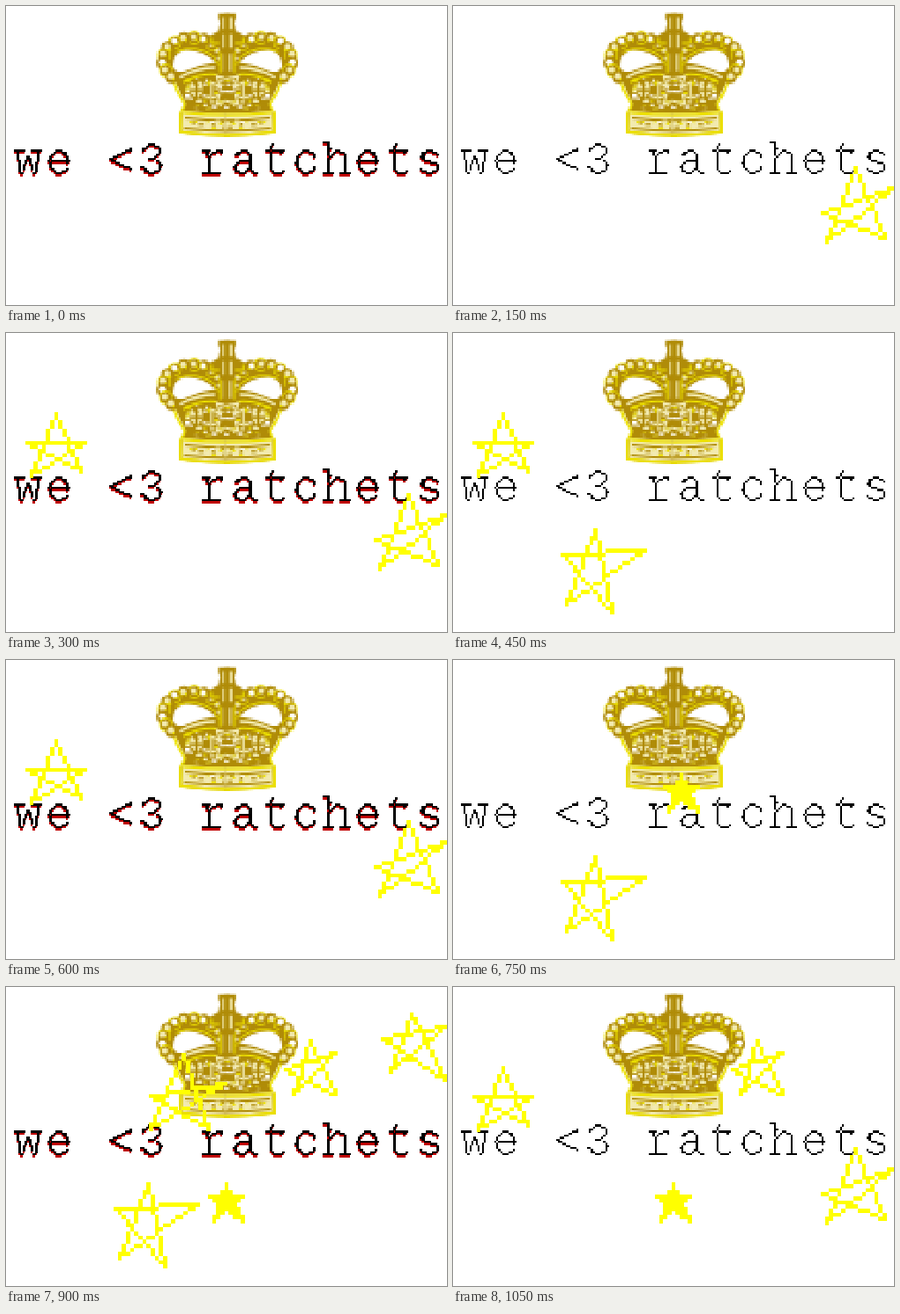
An HTML page with a canvas that plays this animation: 500x340 px, repeating every 1.2 s.

```html
<!DOCTYPE html>
<html lang="en">
<head>
<meta charset="utf-8">
<title>we &lt;3 ratchets</title>
<style>
  html, body { margin: 0; width: 100%; height: 100%; overflow: hidden; background: #fff; }
  canvas { display: block; width: 500px; height: 340px; }
</style>
</head>
<body>
<canvas id="stage" width="500" height="340"></canvas>
<script>
const PIXEL = 7 / 3;      // size of one coarse pixel
const CELL = 2 * PIXEL;   // width of the star pen
const STEP = 150;
const GOLD = '#b08c08', LEMON = '#ece000', PALE = '#f2eab0', WHITE = '#fff', YELLOW = '#ff0';
const MESSAGE = 'we <3 ratchets';

const stage = document.getElementById('stage').getContext('2d');
stage.imageSmoothingEnabled = false;

function coarseContext() {
  const canvas = document.createElement('canvas');
  canvas.width = 215;
  canvas.height = 146;
  return canvas.getContext('2d', { willReadFrequently: true });
}

function block(x, y, size, originX = 0, originY = 0) {
  const left = Math.round(originX + x * size), top = Math.round(originY + y * size);
  const right = Math.round(originX + (x + 1) * size);
  const bottom = Math.round(originY + (y + 1) * size);
  stage.fillRect(left, top, right - left, bottom - top);
}

// Lettering: thin the glyphs to one coarse pixel and add slab serifs.
const SERIFS = {   // offset from glyph centre, row, length
  w: [[-6, 70, 5], [2, 70, 5]],
  r: [[-5, 70, 4], [-5, 81, 9]],
  h: [[-6, 66, 3], [-6, 81, 5], [2, 81, 5]]
};

function makeLettering() {
  const g = coarseContext(), { width, height } = g.canvas;
  const centre = i => 10.5 + 15 * i;
  g.font = '22px "Liberation Mono", "Courier New", monospace';
  g.textAlign = 'center';
  [...MESSAGE].forEach((char, i) => g.fillText(char, centre(i), 82));
  const data = g.getImageData(0, 0, width, height).data;
  const alpha = (x, y) => data[(y * width + x) * 4 + 3];
  const dots = [];
  for (let y = 60; y < 90; y++) {
    for (let x = 1; x < width - 1; x++) {
      const a = alpha(x, y);
      const ridgeX = a >= alpha(x - 1, y) && a > alpha(x + 1, y);
      const ridgeY = a >= alpha(x, y - 1) && a > alpha(x, y + 1);
      if (a > 100 && (ridgeX || ridgeY)) dots.push([x, y]);
    }
  }
  [...MESSAGE].forEach((char, i) => {
    for (const [dx, y, length] of SERIFS[char] || []) {
      for (let n = 0; n < length; n++) dots.push([Math.floor(centre(i)) + dx + n, y]);
    }
  });
  return dots;
}

function drawLettering(dots, shaded) {
  const print = (color, dx, dy) => {
    stage.fillStyle = color;
    for (const [x, y] of dots) block(x, y, PIXEL, dx, dy);
  };
  if (shaded) {
    print('#c00000', 0, PIXEL);
    print('#000', 1, 0);
  }
  print('#000', 0, 0);
}

// Crown: one half in stage units around its axis, then mirrored.
function seededRandom(seed) {
  return () => (seed = seed * 16807 % 2147483647) / 2147483647;
}

function drawCrownHalf(g) {
  const fill = (path, color) => { g.fillStyle = color; g.fill(new Path2D(path)); };
  const line = (path, color, width) => {
    g.strokeStyle = color;
    g.lineWidth = width;
    g.stroke(new Path2D(path));
  };
  const dot = (x, y, r, color) => {
    g.fillStyle = color;
    g.beginPath();
    g.arc(x, y, r, 0, 7);
    g.fill();
  };
  const random = seededRandom(41);
  const flecks = (count, x, y, width, height) => {
    for (let i = 0; i < count; i++) {
      g.fillStyle = [GOLD, LEMON, PALE, WHITE][Math.floor(random() * 4)];
      g.fillRect(x + random() * width, y + random() * height, 2.5 + random() * 4, 2.4);
    }
  };

  // body and the open space under the arch
  fill('M3 48 H-20 Q-38 34 -60 44 Q-76 58 -62 80 L-47 112 L-54 122 V144 Q-28 148 3 148 Z', GOLD);
  line('M-64 78 Q-58 98 -48 112 L-53 122 V143 Q-28 147 3 147', LEMON, 3);
  fill('M-13 64 Q-28 49 -48 50 Q-62 53 -62 68 Q-59 77 -48 74 Q-32 66 -13 64 Z', WHITE);
  line('M-14 58 Q-36 42 -58 52', LEMON, 2);
  line('M-54 81 Q-34 70 -14 70', PALE, 3);
  line('M-50 87 Q-32 76 -12 78', LEMON, 2.5);

  // ornaments above the band
  flecks(75, -49, 82, 48, 34);
  fill('M-41 86 L-35 93 L-30 85 L-27 97 L-34 105 L-43 98 Z', PALE);
  line('M-35 84 V107 M-43 96 H-26', GOLD, 3);
  line('M3 83 L-12 80 L-9 91 L-18 87 V105 L-9 101 L-12 111 L3 108', PALE, 2.5);
  line('M-47 112 Q-25 118 3 118', GOLD, 3);

  // band
  fill('M-51 119 Q-25 122 3 122 V146 Q-28 146 -52 142 Z', PALE);
  line('M-50 121 Q-25 124 3 124', LEMON, 2.5);
  line('M-48 127 Q-25 130 3 130 M-49 139 Q-25 142 3 142', GOLD, 2.6);
  flecks(22, -48, 129, 47, 9);
  line('M-53 121 V143 Q-28 147 3 147', LEMON, 2.6);

  // pearls along the arch
  for (let i = 0; i < 12; i++) {
    const angle = -(6 + i * 20) * Math.PI / 180;
    const x = -40 + 33 * Math.cos(angle), y = 62 + 26 * Math.sin(angle);
    dot(x, y, 7.4, i % 2 ? GOLD : LEMON);
    dot(x, y, 6.2, GOLD);
    dot(x - 1, y - 1, 3.7, i % 3 ? PALE : WHITE);
    dot(x + 2, y + 2, 1.6, LEMON);
  }

  // cross and centre post
  fill('M3 9 H-10 V14 L-8 19 L-10 28 H3 Z', GOLD);
  fill('M3 28 H-9 L-20 34 V43 L-9 48 V78 H3 Z', GOLD);
  line('M-18 36 V42 H-9 M-8 53 V76', LEMON, 2.2);
  line('M-4 13 V26 M-4 32 V47 M-3 54 V74', PALE, 2.5);
}

function makeCrown() {
  const g = coarseContext();
  for (const side of [1, -1]) {
    g.setTransform(side / PIXEL, 0, 0, 1 / PIXEL, 251 / PIXEL, 0);
    drawCrownHalf(g);
  }
  return g.canvas;
}

// Stars: tips in pen cells, clockwise from the top.
const SMALL = [[4, 0], [8, 3], [8, 9], [1, 9], [0, 3]];
const STARS = {
  left: { at: [22, 90], tips: [[7, 0], [14, 7], [13, 14], [1, 15], [0, 7]] },
  bottom: { at: [122, 222], tips: [[8, 0], [20, 5], [12, 20], [1, 18], [0, 6]] },
  right: { at: [417, 182], tips: [[8, 0], [17, 5], [15, 17], [1, 18], [0, 11]] },
  crown: { at: [162, 75], tips: [[8, 0], [18, 7], [14, 18], [0, 18], [0, 10]] },
  upper: { at: [315, 59], tips: [[6, 0], [12, 3], [12, 13], [2, 13], [0, 7]] },
  corner: { at: [425, 29], tips: [[7, 0], [15, 3], [15, 16], [2, 14], [0, 6]] },
  low: { at: [229, 222], tips: SMALL, solid: true },
  middle: { at: [238, 128], tips: SMALL, solid: true }
};

function drawStar({ at, tips, solid }) {
  const corners = tips.map((_, i) => tips[i * 2 % 5]);
  stage.fillStyle = YELLOW;
  corners.forEach(([x0, y0], i) => {
    const [x1, y1] = corners[(i + 1) % 5];
    const steps = Math.max(Math.abs(x1 - x0), Math.abs(y1 - y0));
    for (let n = 0; n <= steps; n++) {
      const t = n / steps;
      block(Math.round(x0 + (x1 - x0) * t), Math.round(y0 + (y1 - y0) * t), CELL, ...at);
    }
  });
  if (!solid) return;
  const shape = new Path2D('M' + corners.join('L') + 'Z');
  for (let y = 0; y < 10; y++) {
    for (let x = 0; x < 9; x++) {
      if (stage.isPointInPath(shape, x, y)) block(x, y, CELL, ...at);
    }
  }
}

const SCENES = [
  '', 'right', 'left right', 'left bottom', 'left right',
  'bottom middle', 'bottom crown upper corner low', 'left right upper low'
].map(names => names.split(' ').filter(Boolean));

const crown = makeCrown();
const lettering = makeLettering();
const start = performance.now();
let shown = -1;

function draw() {
  const scene = Math.floor((performance.now() - start) / STEP) % SCENES.length;
  if (scene !== shown) {
    shown = scene;
    stage.fillStyle = WHITE;
    stage.fillRect(0, 0, 500, 340);
    stage.drawImage(crown, 0, 0, crown.width * PIXEL, crown.height * PIXEL);
    drawLettering(lettering, scene % 2 === 0);
    SCENES[scene].forEach(name => drawStar(STARS[name]));
  }
  requestAnimationFrame(draw);
}
draw();
</script>
</body>
</html>
```
